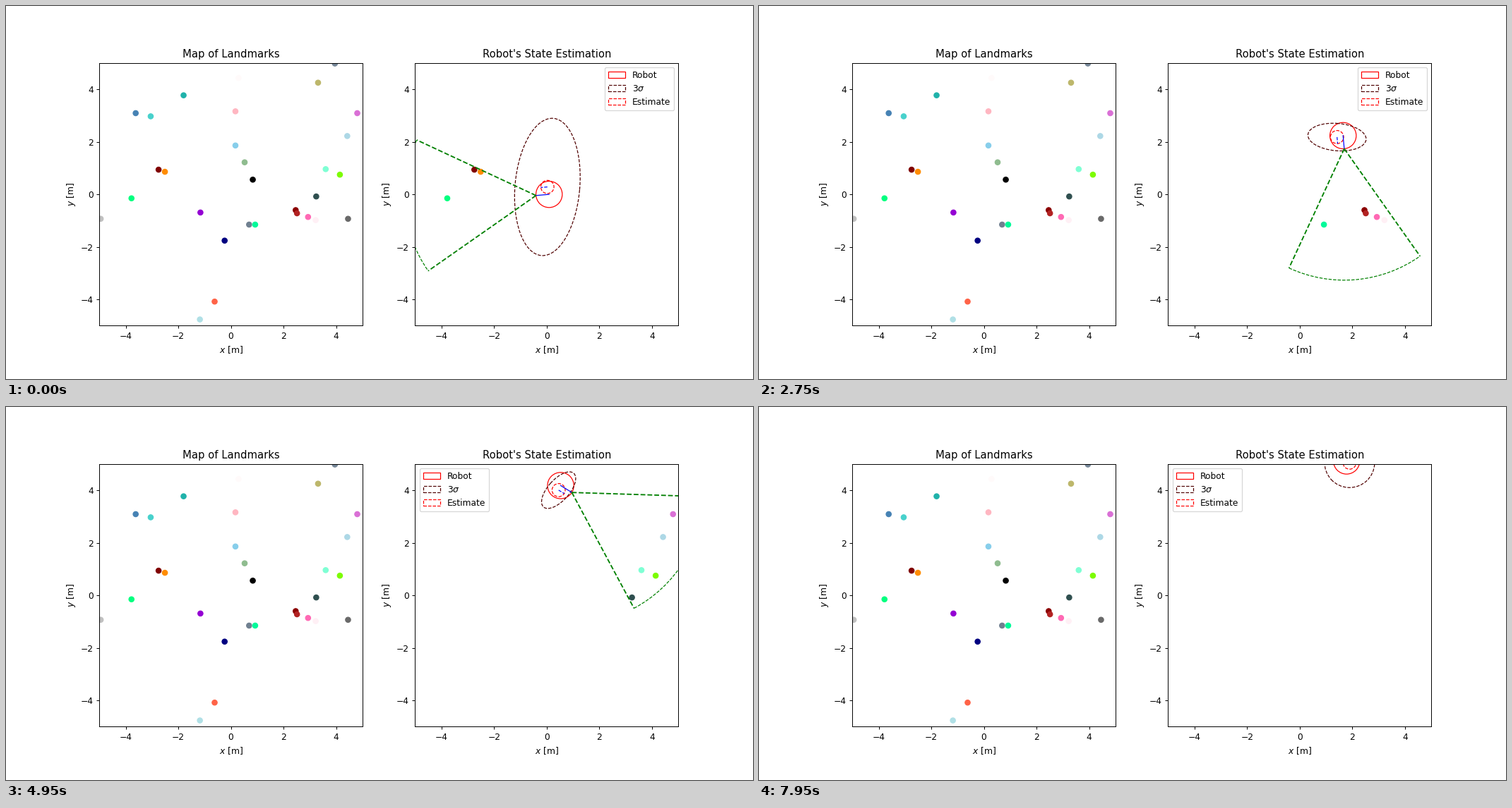
Animation, 1058 px wide and 529 px high, one loop 8 s. Source, as a matplotlib script:

```python
import numpy as np
import matplotlib.pyplot as plt
from matplotlib.animation import FuncAnimation
from matplotlib.patches import Arc, Circle, Ellipse

FRAMES, INTERVAL = 160, 50
ROBOT_R, EST_R = 0.5, 0.25
FOV_RANGE, FOV_HALF = 5.0, 30.0
SPEED = 0.052        # metres per step
REVERSE_AT = 112     # the robot backs up until this step, then drives forward
MISS_RATE = 0.15     # chance that the sensor overlooks a landmark

LANDMARKS = {
    "steelblue": (-3.62, 3.09), "mediumturquoise": (-3.05, 2.97),
    "lightseagreen": (-1.80, 3.77), "snow": (0.29, 4.43),
    "lightpink": (0.17, 3.16), "skyblue": (0.17, 1.86),
    "darkseagreen": (0.52, 1.22), "black": (0.83, 0.56),
    "maroon": (-2.75, 0.94), "darkorange": (-2.51, 0.86),
    "springgreen": (-3.78, -0.15), "silver": (-4.95, -0.93),
    "darkviolet": (-1.16, -0.69), "navy": (-0.24, -1.76),
    "slategray": (0.69, -1.15), "mediumspringgreen": (0.92, -1.15),
    "tomato": (-0.62, -4.08), "powderblue": (-1.18, -4.76),
    "darkred": (2.46, -0.60), "firebrick": (2.51, -0.72),
    "hotpink": (2.93, -0.86), "lavenderblush": (3.22, -0.98),
    "darkslategray": (3.24, -0.08), "aquamarine": (3.60, 0.96),
    "lawngreen": (4.14, 0.75), "dimgray": (4.45, -0.93),
    "lightblue": (4.42, 2.22), "orchid": (4.80, 3.09),
    "darkkhaki": (3.31, 4.25), "lightslategray": (3.95, 4.98),
}
COLORS = np.array(list(LANDMARKS))
SPOTS = np.array(list(LANDMARKS.values()))

# Key poses: step, x, y, viewing direction in degrees
POSES = np.array([
    (0, 0.09, 0.0, 185), (20, 1.035, 0.39, 227.4), (42, 1.625, 1.545, 259),
    (69, 1.46, 2.955, 292.6), (87, 0.995, 3.80, 311.4),
    (REVERSE_AT, -0.08, 4.415, 346.4), (FRAMES - 1, 1.78, 5.115, 413),
])


def unit(deg):
    return np.array([np.cos(np.radians(deg)), np.sin(np.radians(deg))])


def pose(step):
    """Hermite curve through the key poses, tangent to the viewing direction."""
    i = min(np.searchsorted(POSES[:, 0], step, side="right"), len(POSES) - 1)
    (t0, *p0, deg0), (t1, *p1, deg1) = POSES[i - 1:i + 1]
    u = (step - t0) / (t1 - t0)
    ease = u * u * (3 - 2 * u)
    reach = SPEED * (t1 - t0) * (1 if step >= REVERSE_AT else -1)
    pos = ((1 - ease) * np.array(p0) + ease * np.array(p1)
           + reach * u * (1 - u) * ((1 - u) * unit(deg0) - u * unit(deg1)))
    return pos, deg0 + u * (deg1 - deg0)


def estimate(step, deg):
    """Error of the estimate and the 3-sigma half axes."""
    error = (0.29 - 0.16 * step / FRAMES) * unit(deg - 82)
    # Information adds up with each step, until the landmarks are lost.
    axes = np.array([2.62, 1.23]) / np.sqrt(1 + step / 12)
    lost = max(0, (step - REVERSE_AT) / (FRAMES - 1 - REVERSE_AT))
    return error, axes + lost * (0.95 - axes)


def detected(step, apex, deg):
    rel = SPOTS - apex
    bearing = np.degrees(np.arctan2(rel[:, 1], rel[:, 0]))
    off = (bearing - deg + 180) % 360 - 180
    noticed = np.random.default_rng(step).random(len(SPOTS)) > MISS_RATE
    return noticed & (np.abs(off) < FOV_HALF) & (np.hypot(*rel.T) < FOV_RANGE)


fig, (ax_map, ax) = plt.subplots(1, 2, figsize=(12, 6), dpi=1058 / 12)
for a, title in ((ax_map, "Map of Landmarks"), (ax, "Robot's State Estimation")):
    a.set_aspect("equal")
    a.set(xlim=(-5, 5), ylim=(-5, 5), title=title, xlabel="$x$ [m]", ylabel="$y$ [m]")
    a.set_xticks(range(-4, 5, 2))
    a.set_yticks(range(-4, 5, 2))

ax_map.scatter(*SPOTS.T, c=COLORS)
dots = ax.scatter(*SPOTS.T, c=COLORS)

robot = ax.add_patch(Circle((0, 0), ROBOT_R, fill=False, ec="r", label="Robot"))
sigma = ax.add_patch(Ellipse((0, 0), 1, 1, fill=False, ec="#500000", ls="--",
                             label=r"$3\sigma$"))
guess = ax.add_patch(Circle((0, 0), EST_R, fill=False, ec="r", ls="--", label="Estimate"))
arc = ax.add_patch(Arc((0, 0), 2 * FOV_RANGE, 2 * FOV_RANGE, theta1=-FOV_HALF,
                       theta2=FOV_HALF, ec="g", ls="--"))
nose, = ax.plot([], [], "b-", lw=1)
guess_nose, = ax.plot([], [], "b--", lw=1)
edges = [ax.plot([], [], "g--", lw=1.5)[0] for _ in range(2)]
ax.legend(loc="best")


def ray(line, start, length, deg):
    """Draw a line from start and return its far end."""
    end = start + length * unit(deg)
    line.set_data(*np.transpose([start, end]))
    return end


def update(step):
    pos, deg = pose(step)
    error, axes = estimate(step, deg)
    mean = pos + error

    robot.center = pos
    guess.center = mean
    apex = ray(nose, pos, ROBOT_R, deg)
    ray(guess_nose, mean, EST_R, deg)

    sigma.set_center(mean)
    sigma.width, sigma.height = 2 * axes
    sigma.angle = deg - 100

    arc.set_center(apex)
    arc.angle = deg
    for line, side in zip(edges, (-FOV_HALF, FOV_HALF)):
        ray(line, apex, FOV_RANGE, deg + side)

    seen = detected(step, apex, deg)
    dots.set_offsets(SPOTS[seen])
    dots.set_color(COLORS[seen])
    return []


anim = FuncAnimation(fig, update, frames=FRAMES, interval=INTERVAL, repeat=True,
                     repeat_delay=0, init_func=lambda: [])
plt.show()
```
